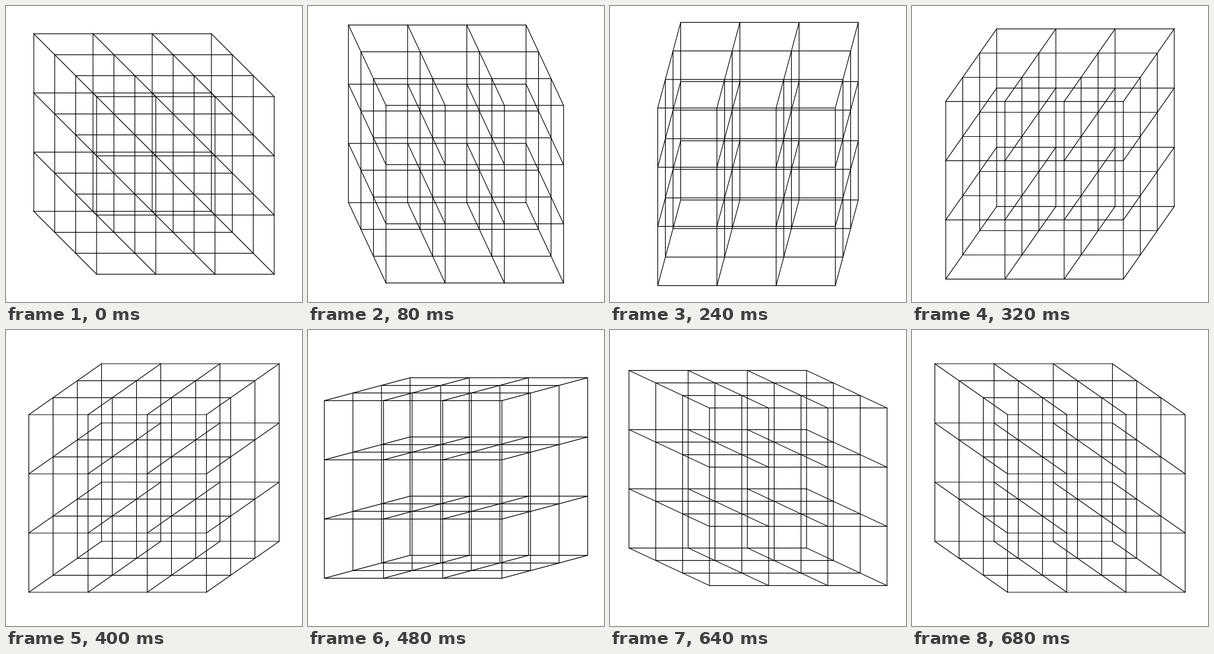
These frames come from a looping animation (500 px wide and 500 px high, 720 ms). An HTML page with a canvas:

```html
<!DOCTYPE html>
<html lang="en">
<head>
<meta charset="utf-8">
<title>Turning lattice</title>
<style>
  html, body { margin: 0; width: 100%; height: 100%; overflow: hidden; background: #fff; }
  canvas { display: block; }
</style>
</head>
<body>
<canvas id="stage" width="500" height="500"></canvas>
<script>
const ctx = document.getElementById('stage').getContext('2d');
const CENTER = 250, CELLS = 3, CELL = 100, DEPTH = 150;
const STEP_MS = 40, STEPS = 18;
const START = 45, TURN = 180 / STEPS;

// Oblique projection: the depth axis leans along (dx, dy).
function project([i, j, k], dx, dy) {
  const half = CELLS / 2, z = k / CELLS - 0.5;
  return [
    CENTER + (i - half) * CELL + z * dx,
    CENTER + (j - half) * CELL + z * dy
  ];
}

function line(a, b, dx, dy) {
  ctx.beginPath();
  ctx.moveTo(...project(a, dx, dy));
  ctx.lineTo(...project(b, dx, dy));
  ctx.stroke();
}

function draw(step) {
  const angle = (START + step * TURN) * Math.PI / 180;
  const dx = DEPTH * Math.cos(angle), dy = DEPTH * Math.sin(angle);
  ctx.fillStyle = '#fff';
  ctx.fillRect(0, 0, 500, 500);
  ctx.strokeStyle = '#000';
  ctx.lineWidth = 1.2;
  ctx.lineCap = 'round';
  for (let u = 0; u <= CELLS; u++) {
    for (let v = 0; v <= CELLS; v++) {
      line([0, u, v], [CELLS, u, v], dx, dy);
      line([u, 0, v], [u, CELLS, v], dx, dy);
      line([u, v, 0], [u, v, CELLS], dx, dy);
    }
  }
}

const origin = performance.now();
let shown = -1;
function tick() {
  const elapsed = Math.max(0, performance.now() - origin);
  const step = Math.floor(elapsed / STEP_MS) % STEPS;
  if (step !== shown) draw(shown = step);
  requestAnimationFrame(tick);
}
tick();
</script>
</body>
</html>
```
